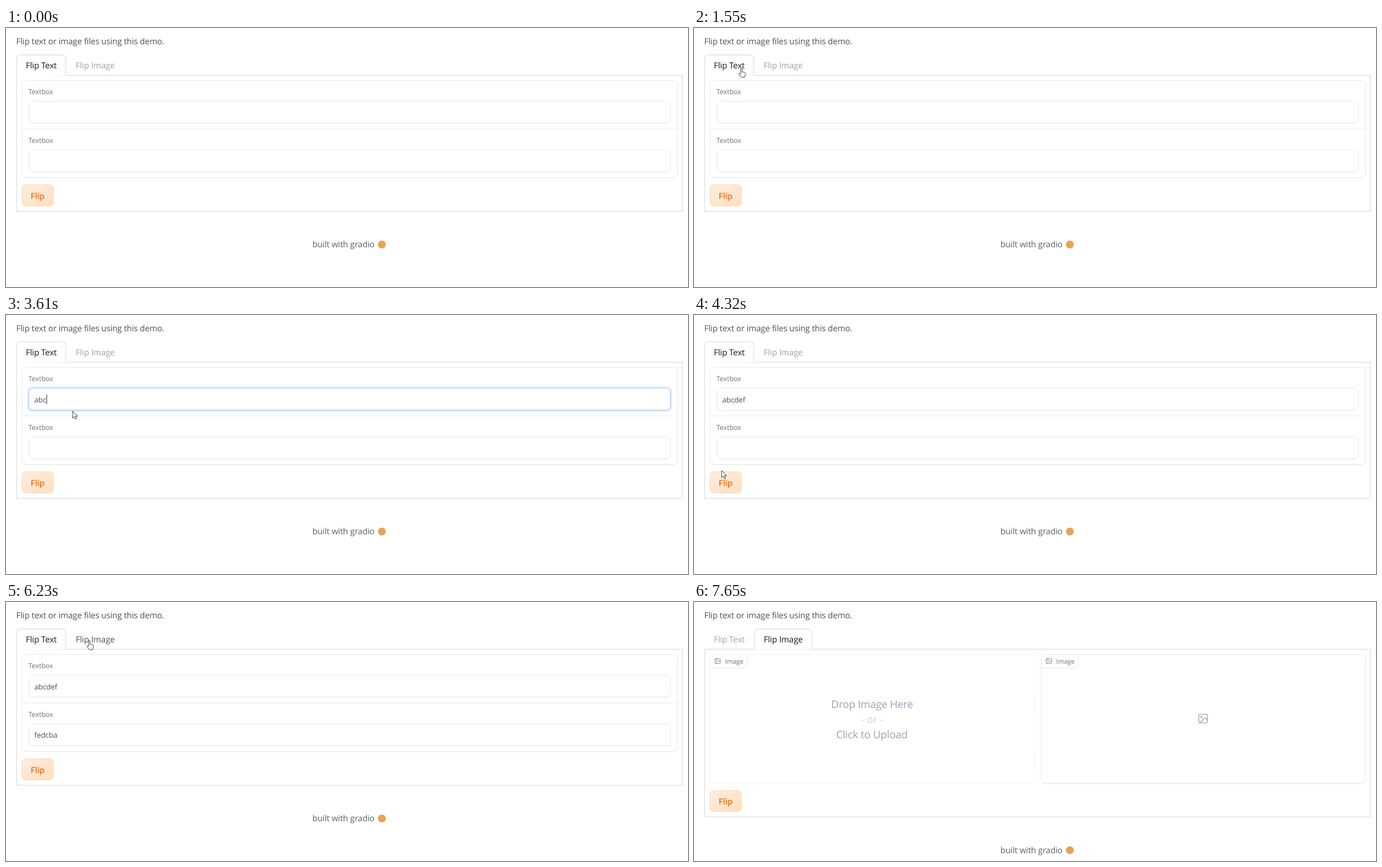
Write an HTML page that moves like this. It is 1213 px wide and 462 px high and loops after 7.97 s.

```html
<!DOCTYPE html>
<html lang="en">
<head>
<meta charset="utf-8">
<title>Flip demo</title>
<style>
  html, body { margin: 0; width: 100%; height: 100%; overflow: hidden; background: #fff; }
  svg { display: block; width: 1213px; height: 462px; }
  text { font: 14.85px "Open Sans", "Noto Sans", sans-serif; letter-spacing: -.01em; fill: #4b4f58; text-rendering: geometricPrecision; white-space: pre; }
  .line { fill: #fff; stroke: #e9e9ec; }
  .edge { stroke-width: 1.6; stroke: #e3e4e6; }
  .soft { filter: drop-shadow(0 1px .6px rgba(0, 0, 0, .04)); }
  .dashed { stroke-dasharray: 3 2; }
  .tab { fill: #9ca3af; }
  .tab.hover { fill: #4b5563; }
  .tab.on { fill: #18181b; }
  .label { font-size: 12.3px; fill: #6b7280; }
  .value { font-size: 13.2px; }
  .badge { font-size: 11.5px; fill: #6b7280; }
  .drop { font-size: 18.6px; fill: #9ca3af; text-anchor: middle; }
  .or { fill: #d1d5db; }
  .btn { fill: url(#warm); stroke: #fdd9b5; }
  .btn.hover { fill: url(#warmer); }
  .btn-text { font-weight: 600; fill: #dd7422; }
  .footer { font-size: 14.95px; fill: #5a5f69; }
  .icon { fill: none; stroke: #6b7280; stroke-width: 1.7; stroke-linecap: round; stroke-linejoin: round; }
  .big { stroke: #9ca3af; stroke-width: 1.6; }
  .focus { stroke: #a3cdf3; }
  .pointer { fill: #fff; stroke: #3c3f48; stroke-linejoin: round; }
</style>
</head>
<body>
<svg viewBox="0 0 1213 462">
  <defs>
    <linearGradient id="warm" x2="1" y2="1"><stop stop-color="#ffeddd"/><stop offset="1" stop-color="#ffdfc2"/></linearGradient>
    <linearGradient id="warmer" x2="1" y2="1"><stop stop-color="#ffebd9"/><stop offset="1" stop-color="#ffdbbb"/></linearGradient>
    <g id="pic">
      <rect x="-9" y="-9" width="18" height="18" rx="2"/>
      <circle cx="-3.5" cy="-3.5" r="1.5"/>
      <path d="M9 3L4-2-7 9"/>
    </g>
  </defs>

  <text x="18.2" y="29">Flip text or image files using this demo.</text>
  <rect id="panel" class="line edge" x="18.8" y="84.4" width="1184.4"/>
  <path id="tabEdge" class="line edge"/>
  <text id="tabText" class="tab" x="35.2" y="72.2">Flip Text</text>
  <text id="tabImage" class="tab" x="124" y="72.2">Flip Image</text>

  <g id="textPage">
    <rect class="line soft" x="28.5" y="93.5" width="1166" height="173" rx="8"/>
    <path class="line" d="M29 180H1194"/>
    <text class="label" x="40" y="118">Textbox</text>
    <text class="label" x="40" y="205">Textbox</text>
    <rect id="ring" x="37.5" y="127.5" width="1147" height="45" rx="9" fill="#deedfb"/>
    <rect id="input" class="line soft" x="40.5" y="130.5" width="1141" height="39" rx="7"/>
    <rect class="line soft" x="40.5" y="217.5" width="1141" height="39" rx="7"/>
    <text id="typed" class="value" x="50.3" y="156"></text>
    <text id="result" class="value" x="50.3" y="242">fedcba</text>
    <rect id="caret" y="142" width="1" height="17" fill="#33363d"/>
  </g>

  <g id="imagePage">
    <rect class="line dashed" x="28.5" y="93.5" width="577" height="230" rx="8"/>
    <rect class="line soft" x="617.5" y="93.5" width="577" height="230" rx="8"/>
    <g id="badge">
      <path class="line" d="M28.5 118H86.5q8 0 8-8V93.5" fill="none"/>
      <use href="#pic" class="icon" transform="translate(42 105.3) scale(.5)"/>
      <text class="badge" x="55.3" y="109.5">Image</text>
    </g>
    <use href="#badge" x="589"/>
    <text class="drop" x="316.8" y="189">Drop Image Here</text>
    <text class="drop or" x="316.8" y="216">- or -</text>
    <text class="drop" x="316.4" y="242.5">Click to Upload</text>
    <use href="#pic" class="icon big" transform="translate(905.5 208) scale(.84)"/>
  </g>

  <g id="bottom">
    <rect id="btn" class="btn" x="28.5" y="279.5" width="56" height="38" rx="7"/>
    <text class="btn-text" x="43.8" y="304.5">Flip</text>
    <text class="footer" x="545" y="391.3">built with gradio</text>
    <circle cx="668.5" cy="386.3" r="7" fill="#e9a15b"/>
  </g>

  <path id="hand" class="pointer" d="M4 11.5V1.8a1.3 1.3 0 0 1 2.6 0V7.2l4 1q2 .5 1.9 2.3l-.6 3.2-1 3.3H5.4L1 11.6q-.6-1.4.6-1.6.9 0 2.4 1.5z"/>
  <path id="arrow" class="pointer" d="M.5.5V13l3-2.8 2 4.6 2-.9-2-4.4h3.8z"/>
</svg>
<script>
const LOOP = 7970, STEP = 79;
const FOCUS = 2210, BLUR = 4240, RESULT = 4790;
const switches = [740, 1550, 6380];
const keys = [2880, 2950, 3600, 3850, 3990, 4070];

const easeOut = s => 1 - (1 - s) ** 2;
const easeIn = s => s * s;

// The pointer shows from `show` (or `start`) until `hide` or the next leg.
const legs = [
  { start: 310, end: 940, from: [160, 33], bend: [162, 72], to: [172, 79] },
  { start: 1100, end: 1400, from: [121, 73], to: [84, 71] },
  { start: 1820, end: 1880, hide: 1880, from: [94, 89], to: [94, 89] },
  { show: 3600, start: 3910, end: 4640, from: [118, 171], bend: [45, 267], to: [46, 290] },
  { start: 5030, end: 5590, from: [48, 290], bend: [63, 277], to: [86, 119], ease: easeIn },
  { start: 5740, end: 6210, from: [98, 107], bend: [140, 72], to: [148, 68] },
  { start: 6800, end: 7180, hide: 7270, from: [148, 60], to: [138, 3], ease: easeIn },
  { start: 7500, end: 7579, hide: 7650, from: [124, 21], to: [92, 3] }
];

const $ = id => document.getElementById(id);
const count = (times, t) => times.filter(at => at <= t).length;
const show = (id, on) => $(id).style.display = on ? "" : "none";
const mark = (id, name, on) => $(id).classList.toggle(name, !!on);

function pointer(t) {
  const leg = legs.findLast(l => (l.show ?? l.start) <= t);
  if (!leg || t >= leg.hide) return null;
  const { start, end, from, to, ease = easeOut } = leg;
  const held = Math.floor((t - start) / STEP) * STEP;
  const u = ease(Math.min(1, Math.max(0, held / (end - start))));
  return from.map((a, i) => {
    const b = to[i], c = leg.bend ? leg.bend[i] : (a + b) / 2;
    return (1 - u) ** 2 * a + 2 * u * (1 - u) * c + u * u * b;
  });
}

function tabPath(left, right) {
  const foot = left < 20 ? 86 : 84.4;
  return `M${left} ${foot}V56q0-8 8-8H${right - 8}q8 0 8 8V84.4`;
}

function drawPage(image) {
  const shift = image ? 56.4 : 0;
  show("textPage", !image);
  show("imagePage", image);
  $("panel").setAttribute("height", 242.6 + shift);
  $("bottom").setAttribute("transform", `translate(0 ${shift})`);
  $("tabEdge").setAttribute("d", image ? tabPath(107.8, 209.6) : tabPath(18.8, 106.4));
  mark("tabText", "on", !image);
  mark("tabImage", "on", image);
}

function drawInput(t) {
  const focus = t >= FOCUS && t < BLUR;
  const typed = count(keys, t);
  const lastKey = typed ? keys[typed - 1] : FOCUS;
  show("ring", focus);
  mark("input", "focus", focus);
  $("typed").textContent = "abcdef".slice(0, typed);
  show("result", t >= RESULT);
  show("caret", focus && (t - lastKey) % 1000 < 495);
  if (focus) $("caret").setAttribute("x", Math.round(51 + $("typed").getComputedTextLength()));
}

function drawPointer(pos, image) {
  const [x, y] = pos ?? [-99, -99];
  const inside = (x0, y0, x1, y1) => x > x0 && x < x1 && y > y0 && y < y1;
  const overText = inside(18, 46, 107, 84);
  const overImage = inside(107, 46, 210, 84);
  const overBtn = !image && inside(28, 278, 85, 318);
  const hand = overText || overImage || overBtn;
  mark("tabText", "hover", overText);
  mark("tabImage", "hover", overImage);
  mark("btn", "hover", overBtn);
  show("hand", hand);
  show("arrow", !hand);
  $(hand ? "hand" : "arrow").setAttribute("transform", `translate(${hand ? x - 5 : x} ${y})`);
}

function draw(t) {
  const image = count(switches, t) % 2 === 1;
  drawPage(image);
  drawInput(t);
  drawPointer(pointer(t), image);
}

const origin = performance.now();
function tick() {
  draw((performance.now() - origin) % LOOP);
  requestAnimationFrame(tick);
}
tick();
</script>
</body>
</html>
```
